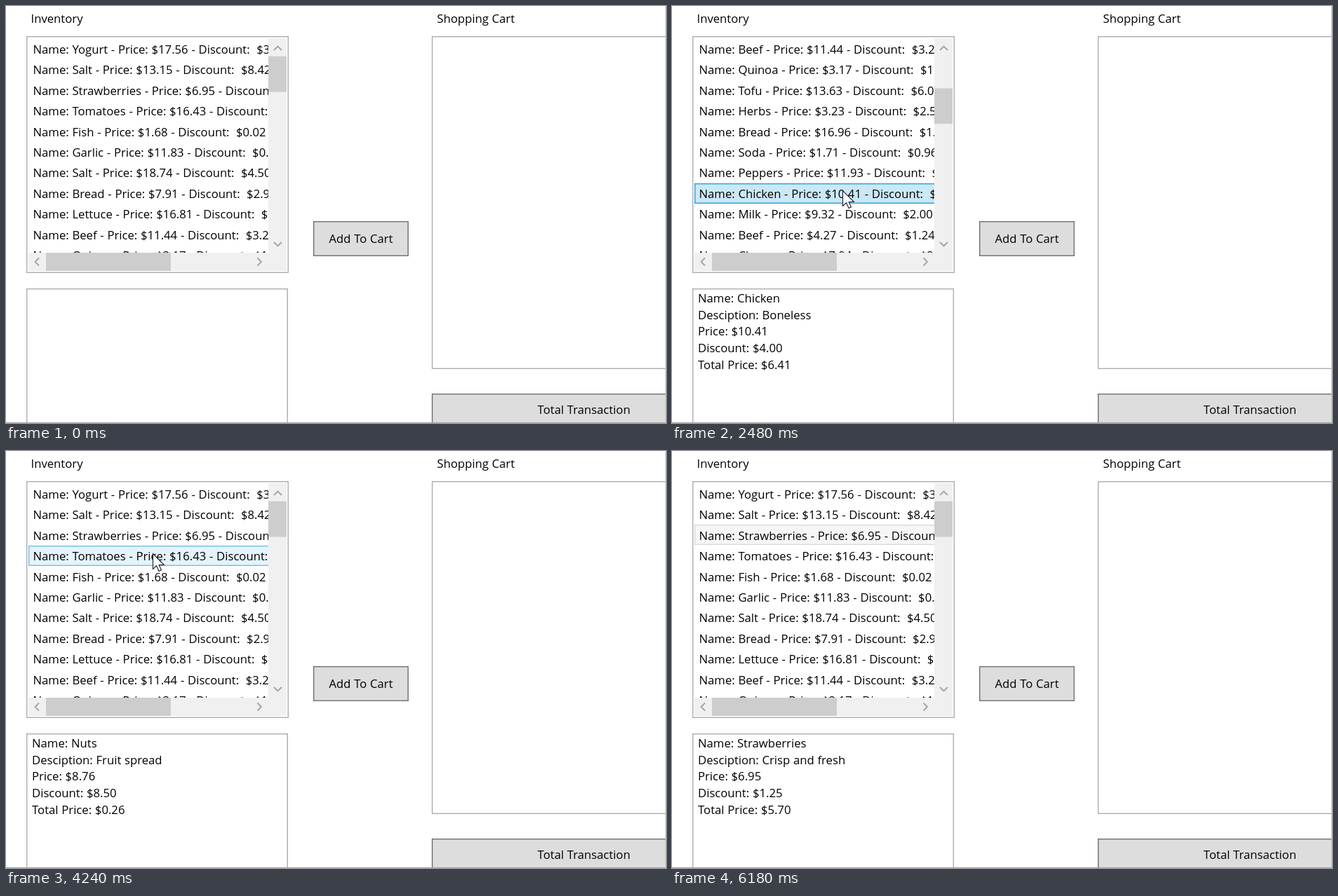
Write an HTML page that moves like this. It is 941 px wide and 595 px high and loops after 6240 ms.

```html
<!DOCTYPE html>
<html lang="en">
<head>
<meta charset="utf-8">
<title>Inventory</title>
<style>
  html, body { margin: 0; width: 100%; height: 100%; overflow: hidden; background: #fff; }
  svg { display: block; width: 941px; height: 595px; }
  text { font: 16.7px "Open Sans", "Noto Sans", sans-serif; word-spacing: .4px; fill: #000; }
  .mid { text-anchor: middle; }
</style>
</head>
<body>
<svg id="stage" viewBox="0 0 941 595"></svg>
<script>
const LOOP = 6240, STEP = 75, TOP = 46, PITCH = 29.5, PAGE = 10, NOTCH = 3;

// name / price / discount
const items = `Yogurt/17.56/3,Salt/13.15/8.42,Strawberries/6.95/1.25,Tomatoes/16.43/2,Fish/1.68/.02,
Garlic/11.83/.6,Salt/18.74/4.5,Bread/7.91/2.9,Lettuce/16.81/5,Beef/11.44/3.2,Quinoa/3.17/1,Tofu/13.63/6,
Herbs/3.23/2.5,Bread/16.96/1,Soda/1.71/.96,Peppers/11.93/5,Chicken/10.41/4,Milk/9.32/2,Beef/4.27/1.24,
Cheese/7.94/2,Soda/2.11/.46,Olive Oil/8.35/3,Oats/3.56/.28,Ginger/4.71/3,Bread/10.76/5,Nuts/8.76/8.5,
Peppers/15.47/5,Tofu/10.21/7.3,Nuts/16.03/6`.split(/,\s*/).map(s => s.split('/'));
const about = { Strawberries: 'Crisp and fresh', Salt: 'Balsamic', Chicken: 'Boneless', Nuts: 'Fruit spread' };

// Pointer strokes: start, end, then the points of a line or a quadratic curve
const strokes = [
  [510, 900, [488, 490], [260, 235]],
  [1340, 1880, [259, 254], [261, 266]],
  [1960, 2170, [251, 266], [243, 263]],
  [3940, 4320, [243, 263], [200, 115]],
  [4780, 5240, [205, 150], [215, 520], [698, 567]],
  [5310, 5390, [698, 567], [703, 575]],
  [5850, 5940, [703, 575], [695, 640]]
];
const wheel = [[1660, 150, 3], [2870, 80, 3], [3710, 76, -6]]; // first notch, gap, notches
const clicks = [[1050, 70], [2340, 140], [3330, 150], [4550, 80], [5620, 80]]; // time, length
const IDLE = 6180;

const clamp = (v, a, b) => Math.min(b, Math.max(a, v));
const mix = (a, b, p) => a.map((v, i) => v + (b[i] - v) * p);

function pointerAt(t) {
  const stroke = strokes.findLast(s => s[0] <= t);
  if (!stroke) return [-99, -99];
  const [start, end, a, ...rest] = stroke, c = rest.pop(), b = rest[0] || mix(a, c, .5);
  const p = t >= end ? 1 : Math.floor((t - start) / STEP) * STEP / (end - start);
  return mix(mix(a, b, p), mix(b, c, p), p).map(Math.round);
}

const scrollAt = t => wheel.reduce((sum, [first, gap, n]) =>
  sum + NOTCH * Math.sign(n) * clamp(Math.floor((t - first) / gap) + 1, 0, Math.abs(n)), 0);

function rowUnder([x, y]) {
  const i = Math.floor((y - TOP - 2) / PITCH);
  return x > 32 && x < 374 && i >= 0 && i < PAGE ? i : -1;
}

function stateAt(t) {
  const at = pointerAt(t), picks = clicks.filter(c => c[0] <= t && rowUnder(pointerAt(c[0])) >= 0);
  const pick = picks.length ? picks.pop()[0] : -1;
  return {
    x: at[0], y: at[1], hover: rowUnder(at), scroll: scrollAt(t), idle: t >= IDLE,
    click: clicks.some(([start, length]) => t >= start && t < start + length),
    sel: pick < 0 ? -1 : scrollAt(pick) + rowUnder(pointerAt(pick))
  };
}

const text = (x, y, s, cls = '') => `<text x="${x}" y="${y}" class="${cls}">${s}</text>`;
const fill = (x, y, w, h, color) => `<rect x="${x}" y="${y}" width="${w}" height="${h}" fill="${color}"/>`;
const box = (x, y, w, h, color, line) =>
  `<rect x="${x + .7}" y="${y + .7}" width="${w - 1.4}" height="${h - 1.4}" fill="${color}" stroke="${line}" stroke-width="1.4"/>`;
const chevron = (x, y, turn) =>
  `<path d="M-5.5 3L0-2.5L5.5 3" transform="translate(${x} ${y}) rotate(${turn})" fill="none" stroke="#a3a3a0" stroke-width="1.8"/>`;
const money = v => '$' + Number(v).toFixed(2);

function row(s, i) {
  const index = s.scroll + i, [name, price, off] = items[index];
  const look = index === s.sel ? (s.idle ? ['#f6f6f6', '#dadada'] : ['#cbe8f6', '#26a0da'])
    : i === s.hover ? ['#e5f3fb', '#70c0e7'] : null;
  return (look ? box(32, Math.round(TOP + PITCH * i), 400, 29, ...look) : '') +
    text(38.5, Math.floor(TOP + 22.2 + 29.45 * i), `Name: ${name} - Price: ${money(price)} - Discount: \u00a0${money(off)}`);
}

function inventory(s) {
  let rows = '';
  for (let i = 0; i <= PAGE; i++) rows += row(s, i);
  return box(29, 43, 374, 338, '#fff', '#abadb3') +
    `<svg width="374.5" height="352">${rows}</svg>` +
    fill(374, 46, 26, 332, '#f0f0f0') + fill(32, 352, 342, 26, '#f0f0f0') +
    fill(374, 71.8 + 5.07 * s.scroll, 26, 50.8, '#cdcdcd') + fill(57, 352, 178, 26, '#cdcdcd') +
    chevron(387.5, 60, 0) + chevron(387.5, 340, 180) + chevron(44, 365, -90) + chevron(361.5, 365, 90);
}

function details(s) {
  const hover = s.x > 29 && s.x < 401 && s.y > 403;
  const frame = box(29, 403, 373, 220, '#fff', hover ? '#7eb4ea' : '#abadb3');
  if (s.sel < 0) return frame;
  const [name, price, off] = items[s.sel];
  return frame + [`Name: ${name}`, `Desciption: ${about[name]}`, `Price: ${money(price)}`,
    `Discount: ${money(off)}`, `Total Price: ${money(price - off)}`]
    .map((line, i) => text(37, Math.round(423 + 23.65 * i), line)).join('');
}

function totalButton(s) {
  const hover = s.x > 607 && s.y > 553 && s.y < 595;
  const look = !hover ? ['#ddd', '#707070'] : s.click ? ['#c4e5f6', '#2c628b'] : ['#bee6fd', '#3c7fb1'];
  return box(607, 553, 434, 60, ...look) + text(824, 582, 'Total Transaction', 'mid');
}

const pointer = s => (s.click ? `<circle cx="${s.x}" cy="${s.y}" r="18" fill="#ff0" fill-opacity=".47"/>` : '') +
  `<path d="M.5.5V22.5L5.5 17.8L9 25.5L12.5 24L9.2 16.5H16.3Z" transform="translate(${s.x} ${s.y})" fill="#fff" stroke="#1c1c2c" stroke-width="1.1"/>`;

const draw = s =>
  text(35.5, 24, 'Inventory') + text(614.5, 24, 'Shopping Cart') +
  inventory(s) + details(s) +
  box(438, 307, 136, 50, '#ddd', '#707070') + text(506, 338, 'Add To Cart', 'mid') +
  box(607, 43, 434, 475, '#fff', '#abadb3') + totalButton(s) +
  fill(0, 594, 941, 1, '#a6a6a6') + fill(940, 0, 1, 595, '#c4c4c4') +
  pointer(s);

const stage = document.getElementById('stage'), start = performance.now();
let shown;
function tick() {
  const markup = draw(stateAt((performance.now() - start) % LOOP));
  if (markup !== shown) stage.innerHTML = shown = markup;
  requestAnimationFrame(tick);
}
tick();
</script>
</body>
</html>
```
